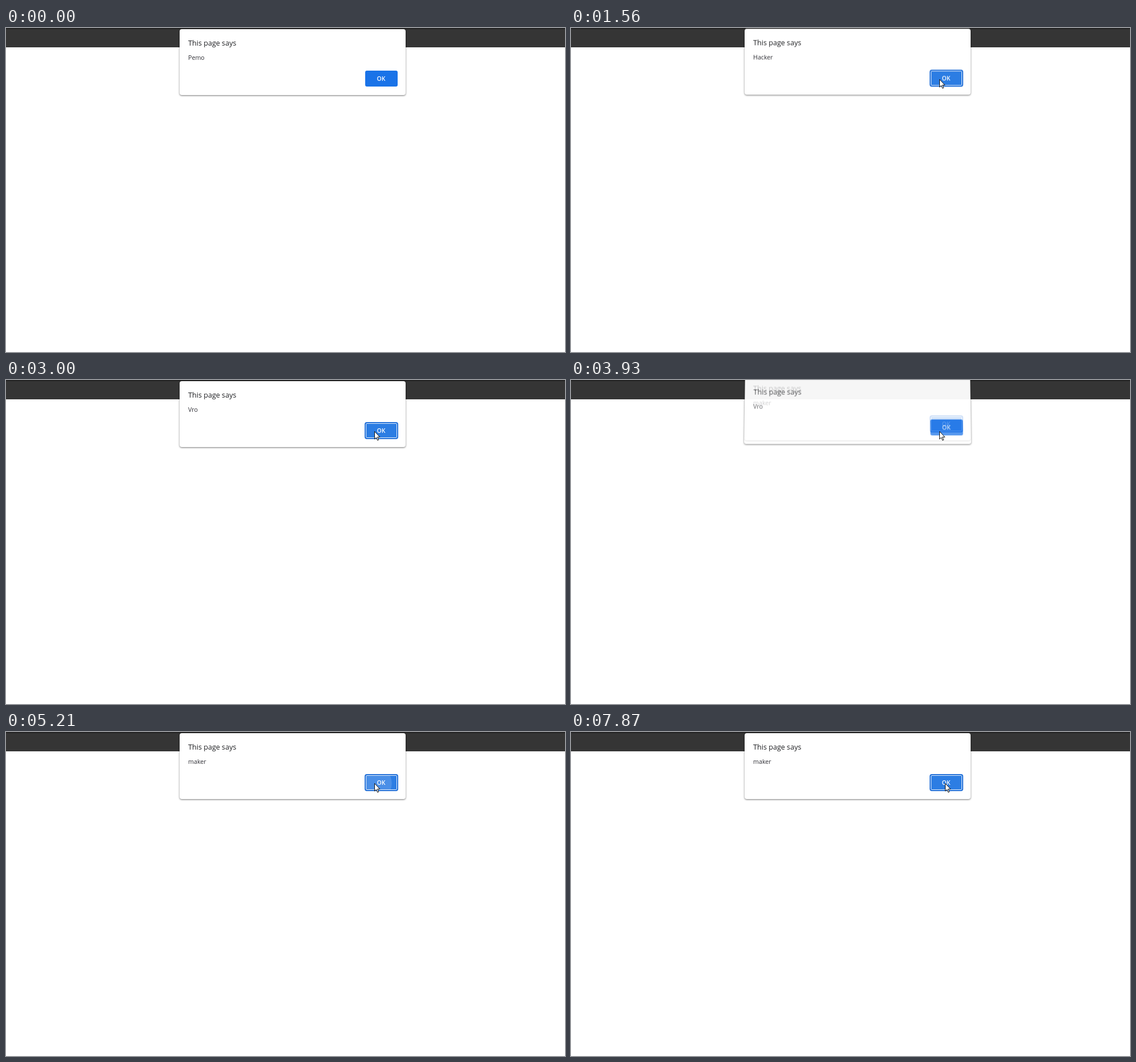
An HTML page for the animation above (8000 ms loop, 982 by 570 pixels).

```html
<!DOCTYPE html>
<html lang="en">
<head>
<meta charset="utf-8">
<style>
  html, body { margin: 0; width: 100%; height: 100%; overflow: hidden; background: #fff; }
  body { position: relative; font-family: "Open Sans", "Noto Sans", sans-serif; }
  .bar { height: 34px; background: #353535; border-top: 2px solid #222; box-sizing: border-box; }
  .dialog {
    position: absolute; left: 305px; top: 2px; width: 397px; height: 116px;
    background: #fff; border-radius: 4px; box-shadow: 0 1px 3px rgba(0, 0, 0, .55);
  }
  .dialog p { position: absolute; left: 15px; margin: 0; line-height: 20px; white-space: nowrap; }
  .title { top: 15px; font-size: 12.6px; color: #202124; }
  .message { top: 40px; font-size: 10.7px; color: #303036; }
  .button {
    position: absolute; left: 326px; top: 73px; width: 57px; height: 28px;
    border-radius: 3px; color: #fff; font: 600 10.4px/28px "Open Sans", "Noto Sans", sans-serif;
    text-align: center; text-indent: -1px;
  }
  .clip { position: absolute; inset: 0; overflow: hidden; border-radius: 3px; }
  .ripple { position: absolute; border-radius: 50%; background: #fff; transform: translate(-50%, -50%); }
  .ring {
    position: absolute; inset: -1px; border: 2px solid #2270d8; border-radius: 4px;
    box-shadow: inset 0 0 0 1px #e4effc;
  }
  #cursor { position: absolute; left: 0; top: 0; overflow: visible; }
</style>
</head>
<body>
<div class="bar"></div>
<svg id="cursor" width="11" height="18">
  <path d="M.5 .5V14l3-2.8 2.2 5 2-.9-2.2-4.9h4.3z" fill="#fff" stroke="#111"/>
</svg>
<script>
const LOOP = 8000, ENTER = 210, EXIT = 160;
const cursor = document.getElementById("cursor");

// opened: moment the dialog has settled; closed: moment it starts to leave
const dialogs = [
  { text: "Pemo", opened: 0, closed: 1380 },
  { text: "Hacker", opened: 1630, closed: 1920 },
  { text: "Vro", opened: 2170, closed: 3860 },
  { text: "maker", opened: 4110, closed: Infinity }
];

const clicks = [
  [1250, 1380], [1870, 1920], [2520, 2670], [2820, 3000], [3230, 3380], [3700, 3860],
  [4270, 4480], [4500, 4730], [4880, 5100], [5110, 5360], [5510, 5760], [5910, 6150],
  [6170, 6400], [6420, 6700], [6800, 6950], [7100, 7350], [7580, 7730]
];

// time, x, y
const path = [
  [130, 790, 500], [610, 630, 63], [760, 630, 63], [1020, 647, 90],
  [6300, 647, 90], [6400, 648, 90], [7580, 648, 90], [7730, 658, 91],
  [7850, 658, 91], [7870, 657, 90]
];

const clamp = v => Math.min(1, Math.max(0, v));

for (const d of dialogs) {
  d.el = document.createElement("div");
  d.el.className = "dialog";
  d.el.innerHTML = `<p class="title">This page says</p><p class="message">${d.text}</p>
    <div class="button"><div class="clip"><div class="ripple"></div></div>
    <div class="ring"></div><span style="position:relative">OK</span></div>`;
  for (const part of ["button", "ripple", "ring"]) d[part] = d.el.querySelector("." + part);
  document.body.insertBefore(d.el, cursor);
}

function cursorAt(t) {
  const next = path.findIndex(k => k[0] > t);
  if (next < 0) return path.at(-1).slice(1);
  if (next === 0) return path[0].slice(1);
  const [t0, x0, y0] = path[next - 1], [t1, x1, y1] = path[next];
  const p = 1 - (1 - (t - t0) / (t1 - t0)) ** 2;
  return [x0 + (x1 - x0) * p, y0 + (y1 - y0) * p];
}

function drawDialog(d, index, t, [x, y]) {
  const enter = index ? clamp((t - d.opened + ENTER) / ENTER) : 1;
  const exit = clamp((t - d.closed) / EXIT);
  const leaving = t >= d.closed;
  const hover = !leaving && x >= 631 && x <= 688 && y >= 75 && y <= 103;
  const shift = -19 * (1 - enter) ** 3 - 28 * exit ** 2;

  d.el.style.opacity = clamp(enter * 1.5) * (1 - exit ** 3.5);
  d.el.style.transform = shift
    ? `translateY(${shift}px) perspective(1000px) rotateX(${exit * 11}deg)` : "none";
  d.button.style.background = hover ? "#2c7de3" : "#1a73e8";
  d.ring.style.display = index && !leaving ? "" : "none";

  const click = !leaving && enter === 1 && clicks.find(c => t >= c[0] && t < c[1]);
  d.ripple.style.display = click ? "" : "none";
  if (click) {
    const size = 0.6 * (t - click[0]);
    Object.assign(d.ripple.style, {
      left: x - 631 + "px", top: y - 75 + "px", width: size + "px", height: size + "px",
      opacity: 0.14 * clamp((click[1] - t) / 60)
    });
  }
}

function draw(now) {
  const t = now % LOOP, point = cursorAt(t);
  dialogs.forEach((d, i) => drawDialog(d, i, t, point));
  cursor.style.display = t < path[0][0] ? "none" : "";
  cursor.style.transform = `translate(${point[0]}px, ${point[1]}px)`;
}

const start = performance.now();
function tick() {
  draw(performance.now() - start);
  requestAnimationFrame(tick);
}
tick();
</script>
</body>
</html>
```
